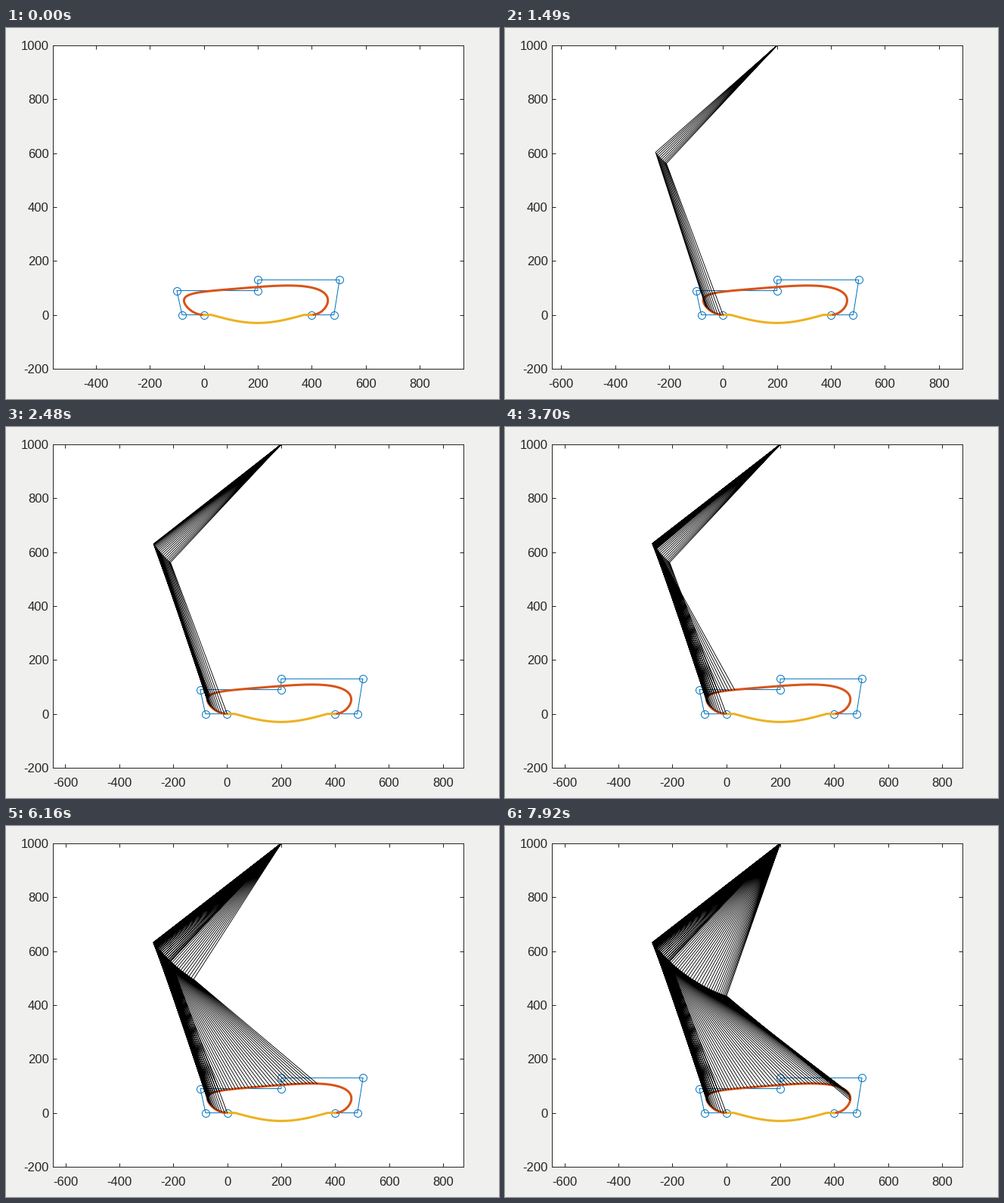
A matplotlib script that plays this animation: 652x491 px, repeating every 8000 ms.

```python
from math import comb

import matplotlib.pyplot as plt
import numpy as np
from matplotlib.animation import FuncAnimation

W, H, DPI = 652, 491, 100
LOOP, TICK = 8000, 20
PX = 72 / DPI  # points per pixel

plt.rcParams.update({
    "font.family": "Liberation Sans",
    "font.size": 12,
    "axes.unicode_minus": False,
})

# Swing path: degree 11 Bezier with repeated control points
CTRL = np.array([(0, 0), (-80.5, 0)] + [(-100, 90)] * 3 + [(200, 90)] * 2
                + [(200, 130)] + [(503.2, 130)] * 2 + [(482.6, 0), (400, 0)])
SAMPLES = 80
HIP = np.array([200.0, 1000.0])
LINK = 600.0


def bezier(t):
    n = len(CTRL) - 1
    basis = [comb(n, i) * t**i * (1 - t)**(n - i) for i in range(n + 1)]
    return np.array(basis).T @ CTRL


def knee(foot):
    """Joint of two equal links between hip and foot, bent to the left."""
    d = foot - HIP
    dist = np.hypot(*d)
    normal = np.array([d[1], -d[0]]) / dist
    return (HIP + foot) / 2 + normal * np.sqrt(LINK**2 - dist**2 / 4)


swing = bezier(np.linspace(0, 1, SAMPLES))
knees = np.array([knee(p) for p in swing])
gap = np.array([np.nan, np.nan])
legs = np.array([(HIP, k, p, gap) for k, p in zip(knees, swing)])

# Redraw times in ms: (first, last, count)
BURSTS = [(500, 1270, 8), (1370, 2140, 8), (2260, 2480, 3), (2700, 3480, 8),
          (3600, 4380, 8), (4480, 5260, 8), (5380, 6160, 8), (6260, 7040, 8),
          (7150, 7920, 8)]
times = np.concatenate([np.linspace(*b) for b in BURSTS]) // TICK * TICK
# Some redraws add two legs at once
DOUBLE = (19, 23, 39, 55)
added = np.ones(len(times), int)
added[list(DOUBLE)] = 2
totals = np.cumsum(added)

fig = plt.figure(figsize=(W / DPI, H / DPI), dpi=DPI, facecolor="#f0f0ee")
# Whole-pixel edges, so that one-pixel lines snap where they belong
ax = fig.add_axes([62 / W, 1 - 451 / H, 543 / W, 428 / H])
INK = "#262626"
for spine in ax.spines.values():
    spine.set(color=INK, linewidth=PX)
ax.tick_params(direction="in", top=True, right=True, length=5 * PX,
               width=PX, color=INK, labelcolor=INK)
ax.tick_params(axis="x", pad=12.6 * PX)
ax.tick_params(axis="y", pad=5.5 * PX)
ax.set_xticks(range(-800, 1001, 200))
ax.set_yticks(range(-200, 1001, 200))
ax.set_ylim(-200, 1000)
SPAN = 1200 * 543 / 428

BLUE = "#0072bd"
ax.plot(*CTRL.T, color=BLUE, lw=PX)
ax.plot(*np.unique(CTRL, axis=0).T, "o", mec=BLUE, mfc="none", mew=PX,
        ms=10 * PX)
ax.plot(*swing.T, color="#d95319", lw=3 * PX)
sx = np.linspace(0, 400, 201)
sy = -30 * np.sin(np.pi * np.clip((sx - 28) / 344, 0, 1))
ax.plot(sx, sy, color="#edb120", lw=3 * PX)
leg_line, = ax.plot([], [], color="black", lw=0.9 * PX,
                    solid_joinstyle="round")


def draw(frame):
    step = np.searchsorted(times, frame * TICK, side="right")
    n = totals[step - 1] if step else 0
    pts = legs[:n].reshape(-1, 2)
    leg_line.set_data(pts[:, 0], pts[:, 1])
    # Equal axes stay centred on the data as the knee moves out
    left = min(CTRL[:, 0].min(), knees[:n, 0].min(initial=0))
    mid = (left + CTRL[:, 0].max()) / 2
    ax.set_xlim(mid - SPAN / 2, mid + SPAN / 2)
    return leg_line,


anim = FuncAnimation(fig, draw, frames=LOOP // TICK, interval=TICK,
                     init_func=lambda: draw(0), repeat=True, repeat_delay=0,
                     blit=False)
plt.show()
```
